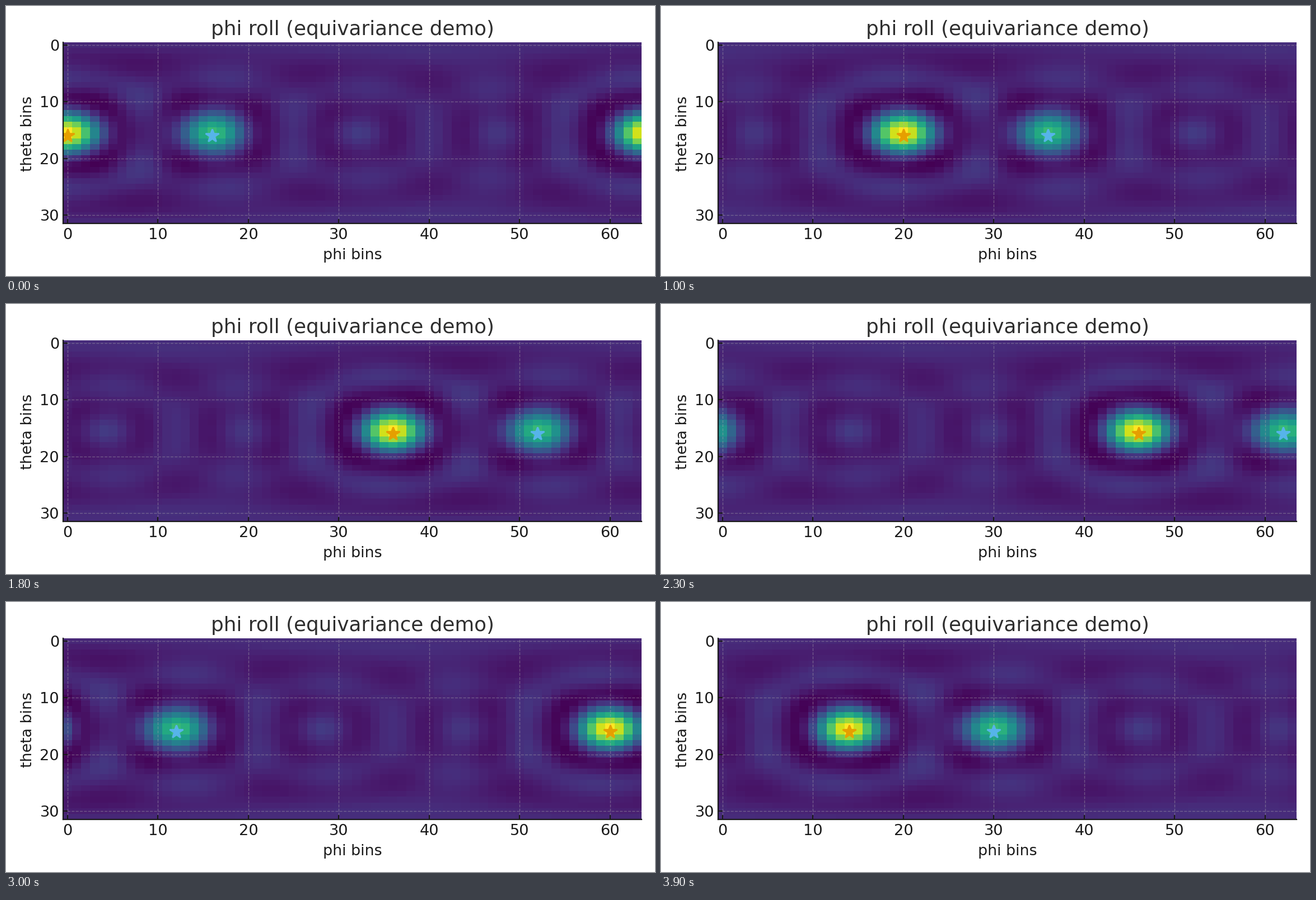
A matplotlib script that plays this animation: 1159 px wide and 483 px high, repeating every 4000 ms.

```python
import numpy as np
import matplotlib.pyplot as plt
from matplotlib.animation import FuncAnimation

W, H, DPI = 1159, 483, 200
ROWS, COLS = 32, 64
FRAMES, STEP = 40, 2
DEGREE, SMOOTHING = 8, 0.01
INK = "#1a1a1a"

# (phi bin, strength, marker colour); both sources sit on the equator
SOURCES = [(0, 1.0, "#E69F00"), (16, 0.63, "#56B4E9")]

plt.rcParams["font.family"] = "DejaVu Sans"
plt.rcParams["font.size"] = 9.8


def band_limited_field():
    """Smoothed point sources on the sphere, truncated at DEGREE."""
    theta = np.pi * (np.arange(ROWS) + 0.5) / ROWS
    phi = 2 * np.pi * np.arange(COLS) / COLS
    degree = np.arange(DEGREE + 1)
    weights = (2 * degree + 1) * np.exp(-SMOOTHING * degree * (degree + 1))
    field = np.zeros((ROWS, COLS))
    for col, strength, _ in SOURCES:
        cos_gamma = np.outer(np.sin(theta), np.cos(phi - phi[col]))
        field += strength * np.polynomial.legendre.legval(cos_gamma, weights)
    return field


def label(x, y, text, **style):
    """Text centred on a pixel position measured from the top left."""
    fig.text(x / W, 1 - y / H, text, ha="center", va="baseline",
             rotation_mode="anchor", **style)


fig = plt.figure(figsize=(W / DPI, H / DPI), dpi=DPI, facecolor="white")
left, right, top, bottom = 102, 1135, 65, 389
ax = fig.add_axes([left / W, 1 - bottom / H, (right - left) / W, (bottom - top) / H])

field = band_limited_field()
image = ax.imshow(field, cmap="viridis", aspect="auto", interpolation="nearest")
stars = [
    ax.plot([col], [ROWS // 2], "*", color=color, ms=8.9, mew=1)[0]
    for col, _, color in SOURCES
]

ax.set_xlim(-0.5, COLS - 0.5)
ax.set_ylim(ROWS - 0.5, -0.5)
ax.set_xticks(range(0, COLS, 10))
ax.set_yticks(range(0, ROWS, 10))
ax.tick_params(direction="in", length=3, width=0.8, pad=3, color=INK, labelcolor=INK)
ax.tick_params(axis="y", pad=2.5)
ax.grid(True, color="#b0b0b0", linestyle="--", linewidth=0.5, alpha=0.4)
ax.spines[["top", "right"]].set_visible(False)
for side in ("left", "bottom"):
    ax.spines[side].set(color=INK, linewidth=0.8)

label(618.5, 51.6, "phi roll (equivariance demo)", fontsize=12.9, color="#2e2e2e")
label(618.5, 453, "phi bins", fontsize=9.7, color=INK)
label(46, 228, "theta bins", fontsize=9.7, color=INK, rotation=90)


def update(frame):
    shift = STEP * frame
    image.set_data(np.roll(field, shift, axis=1))
    for star, (col, _, _) in zip(stars, SOURCES):
        star.set_xdata([(col + shift) % COLS])
    return [image, *stars]


anim = FuncAnimation(fig, update, frames=FRAMES, interval=100, repeat=True, repeat_delay=0)
plt.show()
```
